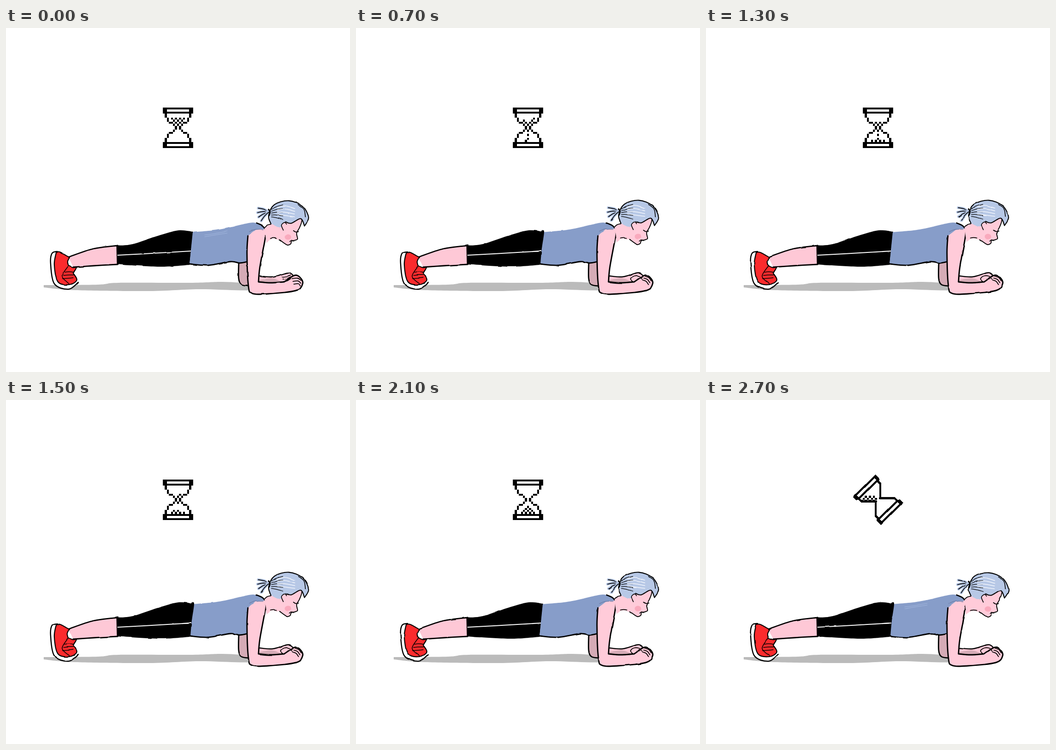
Write an HTML page that moves like this. It is 748 px wide and 748 px high and loops after 2.8 s.

```html
<!DOCTYPE html>
<html lang="en">
<head>
<meta charset="utf-8">
<title>Plank</title>
<style>
  html, body { margin: 0; width: 100%; height: 100%; overflow: hidden; background: #fff; }
  svg { display: block; width: 748px; height: 748px; }
  path { stroke-linecap: round; stroke-linejoin: round; }
  .pixel { shape-rendering: crispEdges; }
</style>
</head>
<body>
<svg viewBox="0 0 748 748">
  <filter id="boil" filterUnits="userSpaceOnUse" x="0" y="0" width="748" height="748" color-interpolation-filters="sRGB">
    <feTurbulence id="noise" type="fractalNoise" baseFrequency=".04" numOctaves="2" result="n"/>
    <feDisplacementMap in="SourceGraphic" in2="n" scale="2.4" xChannelSelector="R" yChannelSelector="G"/>
  </filter>
  <g id="floor"></g>
  <g filter="url(#boil)">
    <g id="body"></g><g id="seam"></g><g id="streaks"></g>
    <g id="arms"></g><g id="open"></g><g id="fist"></g>
    <g id="head"></g><g id="shoe"></g>
  </g>
  <path id="upright" class="pixel"/>
  <g id="tilted" class="pixel"><g id="half"></g><use href="#half" transform="rotate(180 374 217)"/></g>
</svg>
<script>
const $ = id => document.getElementById(id);
const SKIN = '#ffcbd9', SHADE = '#d5abb6', SHIRT = '#879dc9', HAIR = '#b7c8e6', RED = '#fb2b2d', INK = '#000';

function add(group, d, attrs) {
  const path = document.createElementNS('http://www.w3.org/2000/svg', 'path');
  path.setAttribute('d', d);
  for (const key in attrs) path.setAttribute(key, attrs[key]);
  $(group).append(path);
}
function spline(p) {
  return p.slice(1).map((b, i) => {
    const a = p[i], before = p[i - 1] || a, after = p[i + 2] || b;
    return `C${a.map((v, k) => v + (b[k] - before[k]) / 6)} ${b.map((v, k) => v - (after[k] - a[k]) / 6)} ${b}`;
  }).join('');
}
// "|" marks a corner, "-" after it a stretch without ink.
function shape(group, color, width, text, ink = INK) {
  let outline = '', inked = '', last;
  for (const part of text.split('|')) {
    const points = part.replace('-', '').trim().split(/\s+/).map(s => s.split(',').map(Number));
    if (last) points.unshift(last); else outline = 'M' + points[0];
    const d = spline(points);
    outline += d;
    if (!part.startsWith('-')) inked += 'M' + points[0] + d;
    last = points[points.length - 1];
  }
  if (color !== 'none') add(group, outline + 'Z', { fill: color });
  if (width) add(group, inked, { fill: 'none', stroke: ink, 'stroke-width': width });
}
const line = (group, width, text, ink) => shape(group, 'none', width, text, ink);
const times = (n, paint) => { for (let i = 0; i < n; i++) paint(i); };

shape('floor', '#bbb', 0, '82,559 200,558 245,554 400,554 470,552 530,555 | 530,570 420,568 310,572 150,570 82,564');

// Far arm, leg, shirt
shape('body', SHADE, 2.8, '506,511 506,545 512,558 527,561 |- 530,508');
shape('body', SKIN, 2.4, '550,539 580,541 614,532 626,540 |- 612,556 549,556');
shape('body', SHADE, 0, '551,548 578,544 602,553 | 551,554');
shape('body', '#fec8d6', 2.8, '136,498 190,480 243,473 |- 243,514 | 190,517 146,520');
shape('body', INK, 0, '240,473 275,470 330,452 375,440 407,443 | 404,470 399,515 | 340,519 270,516 241,514');
line('body', 2, '243,494 300,491 402,485', '#fff');
shape('body', SHIRT, 2.8, '406,444 |- 465,438 528,424 545,424 | 558,430 566,440 |- 540,470 526,508 | 508,511 488,508 440,516 399,513');
shape('seam', INK, 0, '403,441 | 409,443 404,480 401,513 | 396,514');
line('seam', 2, '385,486 402,485', '#fff');
times(2, i => line('streaks', 0.8, `432,${450 + 4 * i} 455,${447 + 3 * i} 481,${442 + 4 * i}`, '#a9bde2'));

// Near arm and fingers
shape('arms', SKIN, 2.9, '526,452 524,490 527,560 535,577 570,578 630,571 645,556 639,542 627,538 605,552 | 575,554 549,552 | 552,520 563,460 566,436 |- 543,439');
line('arms', 1, '529,443 542,438 559,438', '#61709a');
times(3, i => {
  line('open', 1.8, `${622 + 2 * i},${545 + 6 * i} ${634 + i},${544 + 6 * i} ${642 - i},${549 + 6 * i}`);
  line('open', 1.7, `${600 + 2 * i},${541 + 5 * i} 611,${540 + 5 * i} 619,${537 + 4 * i}`);
  line('fist', 1.8, `${623 + 3 * i},${548 - 4 * i} ${631 + 3 * i},${551 - 4 * i} ${636 + 3 * i},${558 - 4 * i}`);
});
line('fist', 1.8, '602,552 597,545 606,539 617,540 622,546');

// Head
shape('head', SKIN, 1.9, '562,433 568,428 576,426 |- 600,418 645,410 | 642,424 638,434 632,446 634,458 628,461 | 621,463 619,469 611,471 595,460 |- 579,458 566,466');
line('head', 1.6, '575,457 582,456 589,457');
line('head', 1.5, '617,464 621,461 626,463');
line('head', 1.8, '625,440 630,443 636,442');
add('head', 'M606 454a7 6 0 1 0 14 0a7 6 0 1 0 -14 0', { fill: '#f9aabd' });
times(4, i => {
  const at = (r, deg) => `${573 + r * Math.cos(deg * Math.PI / 180)},${400 + r * Math.sin(deg * Math.PI / 180)}`;
  const strand = `${at(2, 180)} ${at(14, 208 - 22 * i)} ${at(26, 200 - 22 * i)}`;
  line('head', 6, strand, HAIR);
  line('head', 1.7, strand);
});
shape('head', HAIR, 2.1, '576,425 571,408 583,384 615,375 645,387 658,412 649,430 | 641,414 620,424 608,421 |- 600,432 590,432');
shape('head', SKIN, 1.7, '603,439 599,428 606,422 610,426');
line('head', 3, '571,394 574,399 572,407');
times(5, i => line('head', 1.2, `577,${394 + 4 * i} 588,${388 + 6 * i} 602,${384 + 8 * i}`));
times(4, i => line('head', 1.5, `590,${390 + 5 * i} 606,${386 + 7 * i} 628,${392 + 6 * i}`, '#f3f6fd'));
line('head', 1.6, '636,384 648,394 651,410');

// Shoe
shape('shoe', '#fff', 2.5, '112,486 100,490 97,512 105,556 136,568 157,553 |- 145,520 120,490');
shape('shoe', RED, 2.2, '109,488 118,488 138,499 | 134,508 136,517 | 145,521 153,521 146,533 | 154,548 138,558 113,552 105,515 109,489');
line('shoe', 1.6, '136,517 122,540 138,556');
times(3, i => line('shoe', 1.6, `${127 - 2 * i},${531 + 7 * i} 137,${530 + 7 * i} ${148 - i},${531 + 6 * i}`));

// Hourglass
const CELL = 4.4;
const cell = ([row, col]) => `M${341 + col * CELL} ${173 + row * CELL}h${CELL}v${CELL}h${-CELL}z`;
const inset = row => Math.round(1 + 5 * ((row - 3) / 6) ** 1.8);
const isGlass = (row, edge) => row < 3
  ? row !== 1 || edge < 2
  : edge >= inset(row) && edge <= Math.max(inset(row), row < 9 ? inset(row + 1) - 1 : 0);

const glassCells = [], upper = [], sideSand = [];
for (let row = 0; row < 20; row++)
  for (let col = 0; col < 15; col++) {
    const mirrored = Math.min(row, 19 - row), edge = Math.min(col, 14 - col);
    const even = (row + col) % 2 === 0;
    if (isGlass(mirrored, edge)) glassCells.push([row, col]);
    if (row > 4 && 7 - edge <= 8 - row && !even) upper.push([row, col]);
    if (row > 10 && row < 17 && col > 7 && edge > inset(mirrored) && even) sideSand.push([row, col]);
  }
const glass = glassCells.map(cell).join('');
// Grains near the top and the middle leave first, and land in the mirrored order.
const leaving = ([row, col]) => row + 0.6 * Math.abs(col - 7);
upper.sort((a, b) => leaving(a) - leaving(b));
const heap = upper.map(([row, col]) => [21 - row, col]);

const frame = { fill: 'none', stroke: INK, 'stroke-width': CELL };
add('half', 'M368 166L375 173L331 215L323 209Z', frame);
add('half', 'M368 162L376 170L371 175L363 167ZM325 205L333 213L327 218L319 211Z', { fill: INK });
add('half', 'M373 176L379 182V212M331 214L338 220.5H370', frame);
let pile = '';
for (let row = 8; row < 11; row++)
  for (let col = 9 - row; col < 7; col++)
    if ((row + col) % 2) pile += cell([row, col]);
add('tilted', pile, { fill: INK });

const show = (id, on) => $(id).style.display = on ? '' : 'none';

function hourglass(f) {
  const tilt = f >= 22 ? Math.floor((f - 20) / 2) : 0;
  const diagonal = tilt % 2 === 1;
  show('upright', !diagonal);
  show('tilted', diagonal);
  $('tilted').setAttribute('transform', `rotate(${(tilt - 3) * 45} 374 217)`);
  $('upright').setAttribute('transform', `rotate(${tilt * 45} 374 217)`);

  const landed = Math.min(10, Math.max(0, Math.round((f - 6) * 0.7)));
  const sand = tilt ? sideSand : upper.slice(Math.ceil(f / 2)).concat(heap.slice(0, landed));
  if (!tilt && f < 21)
    for (let row = 8 + f; row > 9; row -= 2)
      if (row < 16 - landed / 2) sand.push([row, 7]);
  $('upright').setAttribute('d', glass + sand.map(cell).join(''));
}

function draw(f) {
  const pose = f % 8;
  $('noise').setAttribute('seed', pose + 3);
  show('seam', pose === 3 || pose > 5);
  show('streaks', pose < 4);
  show('open', pose < 3);
  show('fist', pose > 2);
  $('head').setAttribute('transform', `translate(0 ${pose < 4 ? 0.6 : -0.4})`);
  hourglass(f);
}

let shown = -1;
function tick() {
  const f = Math.floor(performance.now() % 2800 / 100);
  if (f !== shown) draw(shown = f);
  requestAnimationFrame(tick);
}
tick();
</script>
</body>
</html>
```
